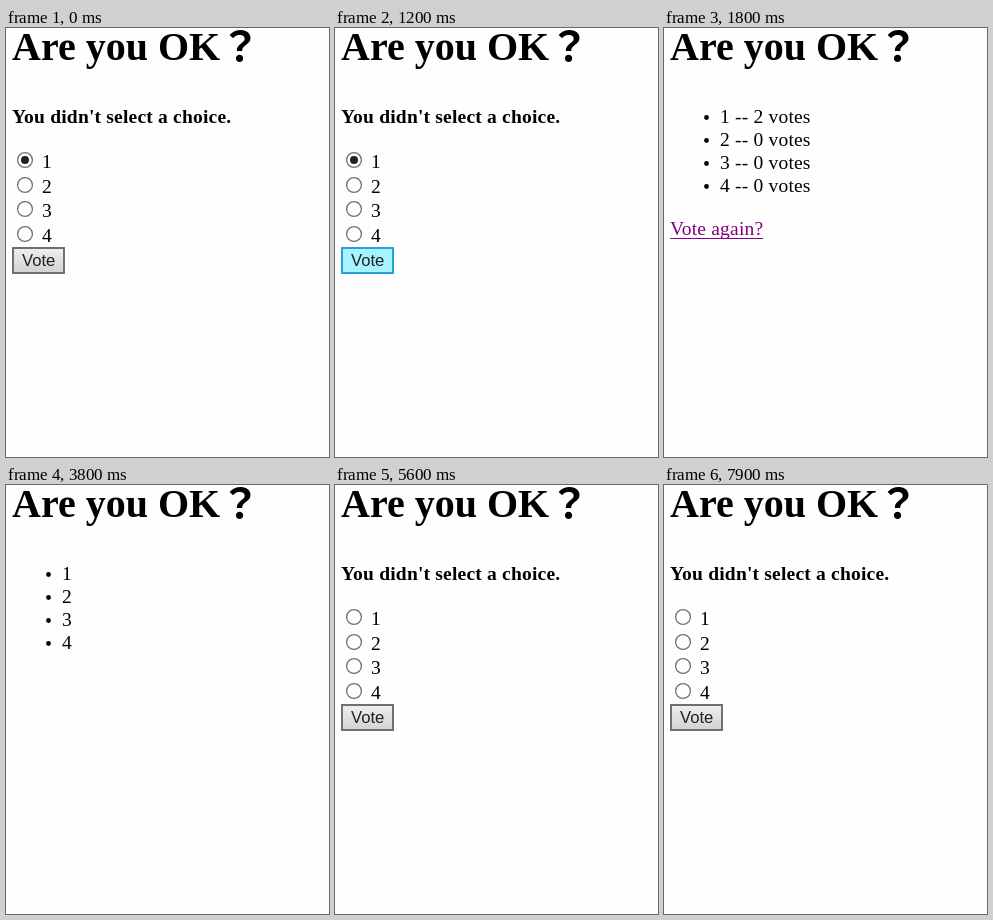
These frames come from a looping animation (323 by 429 pixels, 8000 ms). An HTML page:

```html
<!DOCTYPE html>
<html lang="en">
<head>
<meta charset="utf-8">
<title>Poll</title>
<style>
  html, body { margin: 0; width: 100%; height: 100%; overflow: hidden; background: #fefefe; }
  svg { display: block; width: 100%; height: 100%; font: 19.5px "Liberation Serif", serif; letter-spacing: .2px; }
  .bold { font-weight: bold; }
  .title { font-size: 40px; letter-spacing: 0; }
  .mark { font: bold 41px "Noto Sans CJK JP", "Noto Sans CJK SC", sans-serif; }
  .radio { fill: #fff; stroke: #707070; stroke-width: 1.3; }
  .radio.hover { stroke: #26a0da; fill: #f3fcff; }
  .button rect { fill: url(#face); stroke: #707070; stroke-width: 2; }
  .button.hover rect { fill: #a6f4ff; stroke: #2a9fd8; }
  .button.down rect { fill: #66eaff; stroke: #0a87c4; }
  .button text { font: 16.67px "Liberation Sans", sans-serif; letter-spacing: 0; fill: #212121; }
  .link { fill: #800080; }
</style>
</head>
<body>
<svg viewBox="0 0 323 429">
  <defs>
    <linearGradient id="face" x2="0" y2="1">
      <stop stop-color="#efefef"/><stop offset="1" stop-color="#d2d2d2"/>
    </linearGradient>
  </defs>
  <text class="bold title" x="6" y="32">Are you OK</text>
  <text class="mark" x="213.5" y="33">？</text>
  <g id="form">
    <text class="bold" x="6" y="95">You didn't select a choice.</text>
    <g id="choices"></g>
    <circle id="dot" cx="19" cy="132" r="4" fill="#212121"/>
    <g id="button" class="button">
      <rect x="7" y="220" width="51" height="25"/>
      <text x="16" y="238">Vote</text>
    </g>
  </g>
  <g id="list">
    <g id="items"></g>
    <g id="results">
      <g id="votes"></g>
      <text class="link" x="6" y="207">Vote again?</text>
      <rect class="link" x="6" y="210" width="93" height="1"/>
    </g>
  </g>
</svg>
<script>
const LOOP = 8000;
const $ = id => document.getElementById(id);

const rows = make => [0, 1, 2, 3].map(make).join("");
$("choices").innerHTML = rows(i => {
  const y = 132 + Math.round(i * 24.6);
  return `<circle class="radio" cx="19" cy="${y}" r="7.4"/><text x="36" y="${y + 8}">${i + 1}</text>`;
});
$("items").innerHTML = rows(i =>
  `<circle cx="42.5" cy="${89.5 + i * 23}" r="2.4"/><text x="56" y="${95 + i * 23}">${i + 1}</text>`);
$("votes").innerHTML = rows(i =>
  `<text x="71" y="${95 + i * 23}">-- ${i ? 0 : 2} votes</text>`);
const radios = document.querySelectorAll(".radio");

// Each entry: start time, page, hovered radio, button state
const steps = [
  [0, "form"], [700, "form", 3], [800, "form"],
  [1200, "form", 0, "hover"], [1600, "form", 0, "down"], [1700, "form", 0, "hover"],
  [1800, "results"], [3800, "details"], [5000, "results"],
  [5600, "form"], [6500, "form", 1], [6600, "form"], [6700, "form", 2], [6800, "form"],
  [7000, "form", 2], [7400, "form", 3], [7500, "form", 4], [7900, "form"]
];

const show = (id, on) => $(id).setAttribute("display", on ? "inline" : "none");

function draw(now) {
  const t = now % LOOP;
  const [, page, hovered = 0, state = ""] = steps.findLast(s => s[0] <= t);
  show("form", page === "form");
  show("list", page !== "form");
  show("results", page === "results");
  show("dot", t < 1800);
  radios.forEach((r, i) => r.classList.toggle("hover", i + 1 === hovered));
  $("button").setAttribute("class", "button " + state);
  requestAnimationFrame(() => draw(performance.now()));
}
draw(performance.now());
</script>
</body>
</html>
```
